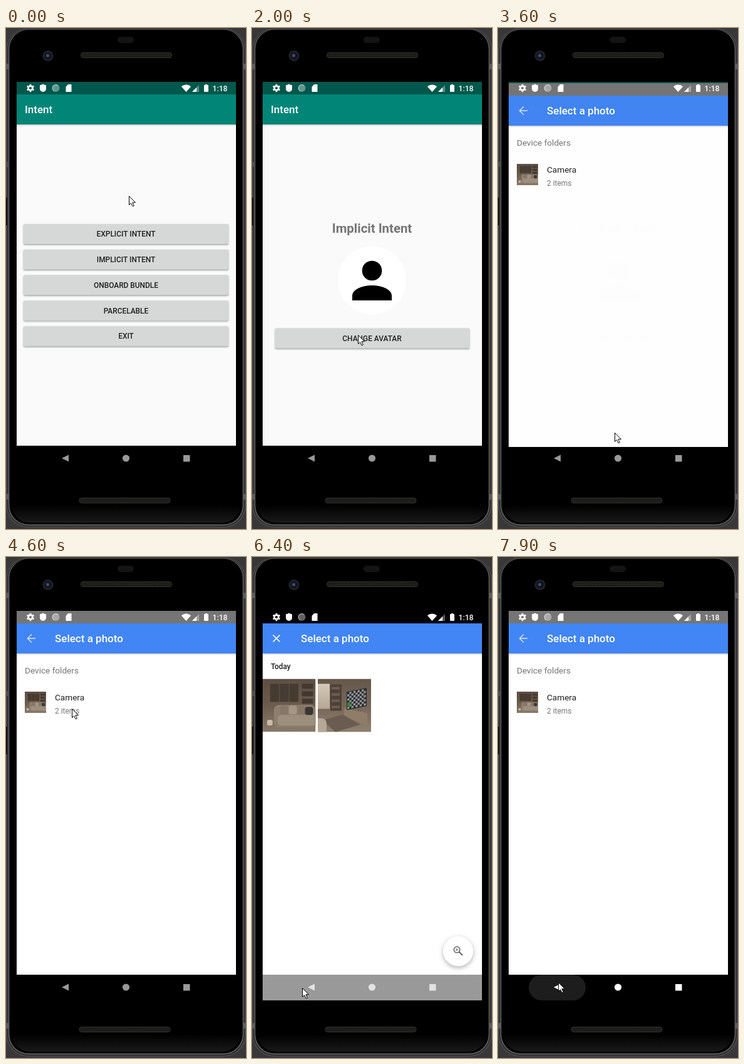
Write an HTML page with a canvas that moves like this. It is 383x800 px and loops after 8000 ms.

```html
<!DOCTYPE html>
<html lang="en">
<head>
<meta charset="utf-8">
<title>Intent demo</title>
<style>
html, body { margin: 0; width: 100%; height: 100%; overflow: hidden; background: #383838; }
canvas { display: block; }
</style>
</head>
<body>
<canvas id="stage" width="383" height="800"></canvas>
<script>
const newLayer = canvas => canvas.getContext('2d');
const g = newLayer(document.getElementById('stage'));
const backdrop = newLayer(Object.assign(document.createElement('canvas'), { width: 383, height: 800 }));
const LOOP = 8000, STEP = 100;
const LEFT = 17, TOP = 86, WIDTH = 350, NAV = 667, BOTTOM = 708, MID = 191.5;

const OPEN_AVATAR = 1300, OPEN_FOLDERS = 3500, OPEN_GRID = 5100, CLOSE_GRID = 7200, GRID_GONE = 7600;

// Pointer glides; bow is the sideways swing at half way
const START = { x: 196, y: 268 };
const GLIDES = [
  { from: 100, to: 800, x: 196, y: 375, bow: 2 },
  { from: 1700, to: 2000, x: 169, y: 490, bow: 0 },
  { from: 2000, to: 2200, x: 169, y: 499, bow: 0 },
  { from: 3000, to: 3600, x: 186, y: 646, bow: 5 },
  { from: 3800, to: 4600, x: 105, y: 242, bow: 0 },
  { from: 5700, to: 6400, x: 80, y: 688, bow: -33 },
  { from: 6800, to: 7100, x: 96, y: 679, bow: 0 }
];

function rect(x, y, w, h, color) {
  g.fillStyle = color;
  g.fillRect(x, y, w, h);
}
function round(x, y, w, h, r, color) {
  g.beginPath();
  g.roundRect(x, y, w, h, r);
  g.fillStyle = color;
  g.fill();
}
function disc(x, y, r, color) {
  g.beginPath();
  g.arc(x, y, r, 0, 7);
  g.fillStyle = color;
  g.fill();
}
function ring(x, y, r, width, color, from = 0, to = 7) {
  g.beginPath();
  g.arc(x, y, r, from, to);
  g.lineWidth = width;
  g.strokeStyle = color;
  g.stroke();
}
function trace(p) {
  g.beginPath();
  for (let i = 0; i < p.length; i += 2) g.lineTo(p[i], p[i + 1]);
}
function poly(color, ...p) {
  trace(p);
  g.closePath();
  g.fillStyle = color;
  g.fill();
}
function line(color, width, ...p) {
  trace(p);
  g.lineWidth = width;
  g.strokeStyle = color;
  g.stroke();
}
function text(s, x, y, size, weight, color, align = 'left') {
  g.font = `${weight} ${size}px Roboto, sans-serif`;
  g.textAlign = align;
  g.fillStyle = color;
  g.fillText(s, x, y);
}
function fade(y0, y1, ...colors) {
  const f = g.createLinearGradient(0, y0, 0, y1);
  colors.forEach((c, i) => f.addColorStop(i / (colors.length - 1), c));
  return f;
}
function raised(alpha, blur, dy, shape) {
  g.save();
  g.shadowColor = `rgba(0,0,0,${alpha})`;
  g.shadowBlur = blur;
  g.shadowOffsetY = dy;
  shape();
  g.restore();
}

function speaker(x, y) {
  round(x, y, 146, 9, 4.5, '#333');
  round(x + 1, y + 1, 144, 7, 3.5, '#1b1b18');
  for (let i = 4; i < 142; i += 3) rect(x + i, y + 3 + i % 2, 1, 2, '#2b2b26');
}

function phone() {
  rect(0, 0, 383, 800, '#383838');
  ['#4a4a4a', '#2b2b2b', '#5c5c5c', '#000'].forEach((color, i) => {
    const d = i * 1.8;
    round(d, d / 2, 383 - 2 * d, 798 - 1.5 * d, 36 - d, color);
  });
  round(8, 740, 367, 50, [0, 0, 30, 30], fade(762, 790, '#000', '#1a1a1a'));
  for (const x of [0, 378])
    for (const y of [57, 744]) rect(x, y, 5, 9, '#5d5d5d');
  rect(0, 214, 5, 8, '#505050');
  rect(0, 271, 1.5, 44, '#000');
  round(178, 14, 26, 10, 5, '#141414');
  disc(67, 44.5, 8.5, '#232326');
  disc(67, 44.5, 6, '#11131f');
  disc(66.5, 44, 2.5, '#414a78');
  speaker(119, 39);
  speaker(116.5, 750);
  rect(LEFT, TOP, WIDTH, BOTTOM - TOP, '#000');
}

function page(title, titleX, status, bar, bg, bottom = NAV) {
  rect(LEFT, TOP, WIDTH, bottom - TOP, bg);
  rect(LEFT, 154, WIDTH, 3, fade(154, 157, 'rgba(0,0,0,.2)', 'rgba(0,0,0,0)'));
  rect(LEFT, TOP, WIDTH, 20, status);
  rect(LEFT, 106, WIDTH, 48, bar);
  text(title, titleX, 136, 17, 500, '#fff');
}

function button(label, x, y, w, age = -1) {
  raised(.4, 2.5, 1.2, () => round(x, y, w, 32, 2, '#d6d7d7'));
  if (age >= 0 && age < 500) {
    const left = 1 - age / 500;
    g.save();
    g.clip();
    rect(x, y, w, 32, `rgba(0,0,0,${.08 * left})`);
    disc(MID, y + 16, 60 + age * .6, `rgba(0,0,0,${.12 * left})`);
    g.restore();
  }
  text(label, MID, y + 20.2, 11.9, 500, '#202020', 'center');
}

function menuPage(t) {
  page('Intent', 30, '#00574b', '#008577', '#fafafa');
  ['EXPLICIT INTENT', 'IMPLICIT INTENT', 'ONBOARD BUNDLE', 'PARCELABLE', 'EXIT'].forEach(
    (s, i) => button(s, 28, 313 + i * 40.8, 327, i == 1 ? t - 1200 : -1));
}

function avatarPage(t) {
  page('Intent', 30, '#00574b', '#008577', '#fafafa');
  text('Implicit Intent', MID, 326.5, 20.4, 700, '#757575', 'center');
  disc(MID, 403, 54.5, '#fff');
  disc(MID, 387.5, 15.8, '#000');
  g.beginPath();
  g.ellipse(MID, 427, 31.5, 16, 0, Math.PI, 0);
  g.fill();
  rect(160, 427, 63, 8, '#000');
  button('CHANGE AVATAR', 37, 479.5, 310, t - 2800);
}

// Runs draw() in an 85 unit square scaled to the given size
function photo(x, y, size, draw) {
  g.save();
  g.translate(x, y);
  g.scale(size / 85, size / 85);
  g.beginPath();
  g.rect(0, 0, 85, 85);
  g.clip();
  draw();
  g.restore();
}
function sofa() {
  rect(0, 0, 85, 85, fade(0, 85, '#5d4f43', '#6b5c4d', '#8a7a69'));
  for (let i = 0; i < 3; i++) {
    rect(12 + i * 15.5, 8, 14.5, 29, '#463b32');
    rect(63, 8 + i * 12, 18, 8, '#43382f');
  }
  round(18, 42, 67, 36, 8, '#8d7f6e');
  round(24, 58, 70, 17, 6, '#9d8f7d');
  for (let i = 0; i < 3; i++) round(28 + i * 14, 43, 13, 14, 4, i % 2 ? '#a49683' : '#857665');
  round(68, 45, 13, 13, 4, '#3a3432');
  round(7, 66, 9, 9, 3, '#c9bcaa');
}
function television() {
  rect(0, 0, 85, 85, fade(0, 85, '#65574a', '#75665a', '#8f806f'));
  rect(0, 8, 19, 40, fade(8, 48, '#d5cabb', '#b3a693'));
  rect(20, 9, 18, 42, '#4d4137');
  for (let i = 0; i < 4; i++) rect(22, 13 + i * 10, 13, 4, '#6d5e50');
  poly('#8f7d69', 42, 47, 79, 55, 79, 74, 42, 61);
  poly('#6a5c50', 8, 66, 40, 57, 68, 73, 28, 85);
  round(-10, 63, 24, 30, 8, '#b5a897');
  g.save();
  g.transform(1, -.2, 0, 1, 46, 21);
  rect(0, 0, 32, 29, '#2d2e2e');
  for (let i = 0; i < 72; i++)
    if ((i + (i / 9 | 0) % 2 * 0) % 2) rect(1 + i % 9 * 3.3, 1 + (i / 9 | 0) * 3.3, 3.3, 3.3, '#92959a');
  g.restore();
  rect(47, 38, 5, 6, '#2a8a35');
}

function folderPage() {
  page('Select a photo', 78, '#757575', '#4285f4', '#fff');
  const faint = 'rgba(255,255,255,.7)';
  line(faint, 1.7, 47, 130, 35, 130);
  line(faint, 1.7, 41, 123.5, 34.5, 130, 41, 136.5);
  text('Device folders', 30, 186, 13.6, 400, '#757575');
  photo(30, 215, 34, sofa);
  text('Camera', 78, 229, 13.6, 400, '#212121');
  text('2 items', 78, 250, 11.9, 400, '#757575');
}

function gridPage() {
  page('Select a photo', 78, '#000', '#4285f4', '#fff', BOTTOM);
  for (const s of [-5.5, 5.5]) line('#fff', 1.7, 39 - s, 124.5, 39 + s, 135.5);
  text('Today', 30, 178.5, 11.9, 500, '#212121');
  photo(17, 194.5, 84.5, sofa);
  photo(105, 194.5, 85, television);
  raised(.3, 7, 2.5, () => disc(329, 629.5, 24, '#fff'));
  const gray = '#616161';
  ring(327, 627, 4.7, 1.6, gray);
  line(gray, 2, 330.5, 630.5, 336, 636);
  line(gray, 1, 324.8, 627, 329.2, 627);
  line(gray, 1, 327, 624.8, 327, 629.2);
}

// Draws one page, shifted down and faded, over another
function slide(under, over, offset, t) {
  if (offset <= 0) return over(t);
  const hidden = Math.min(1, (offset / 38) ** 2);
  under(t);
  rect(LEFT, TOP, WIDTH, NAV - TOP, 'rgba(0,0,0,.12)');
  backdrop.drawImage(g.canvas, 0, 0);
  g.save();
  g.translate(0, offset);
  over(t);
  g.restore();
  g.globalAlpha = hidden;
  g.drawImage(backdrop.canvas, 0, 0);
  g.globalAlpha = 1;
}
const settle = (first, age) => Math.round(first * .138 ** (age / STEP));

function pages(t) {
  g.save();
  g.beginPath();
  g.rect(LEFT, TOP, WIDTH, BOTTOM - TOP);
  g.clip();
  if (t < OPEN_AVATAR) menuPage(t);
  else if (t < OPEN_FOLDERS) slide(menuPage, avatarPage, settle(13, t - OPEN_AVATAR), t);
  else if (t < OPEN_GRID) slide(avatarPage, folderPage, settle(18, t - OPEN_FOLDERS), t);
  else if (t <= CLOSE_GRID) slide(folderPage, gridPage, settle(33, t - OPEN_GRID), t);
  else if (t < GRID_GONE) slide(folderPage, gridPage, Math.round(40 * ((t - CLOSE_GRID) / 400) ** 2), t);
  else folderPage();
  g.restore();
}

function statusIcons() {
  const y = 96, white = '#fff';
  ring(39, y, 3.4, 2.6, white);
  for (let a = Math.PI / 6; a < 6.3; a += Math.PI / 3) {
    const c = Math.cos(a), s = Math.sin(a);
    line(white, 2.6, 39 + 4 * c, y + 4 * s, 39 + 6.2 * c, y + 6.2 * s);
  }
  round(54, 91, 10, 11, [1, 1, 5, 5], white);
  poly(white, 54, 92, 59, 89.5, 64, 92);
  disc(79.5, y, 6, 'rgba(255,255,255,.38)');
  ring(79.5, y, 5.3, 1.2, 'rgba(255,255,255,.5)', 2, 5.5);
  poly(white, 95.5, 94, 99, 90, 104.5, 90, 104.5, 102, 95.5, 102);
  g.beginPath();
  g.moveTo(287.5, 102);
  g.arc(287.5, 102, 11.5, -2.3, -.84);
  g.fill();
  poly('rgba(255,255,255,.35)', 297, 102, 308, 91, 308, 102);
  poly(white, 297, 102, 304, 95, 304, 102);
  round(316, 91, 7, 11, 1, white);
  rect(318, 90, 3, 2, white);
  text('1:18', 329.5, 101, 12.2, 500, white);
}

function navBar(t) {
  const grid = t >= OPEN_GRID && t < GRID_GONE;
  if (grid) rect(LEFT, NAV, WIDTH, BOTTOM - NAV, `rgba(0,0,0,${Math.min(.4, (t - 5000) / 850)})`);
  const press = t >= 7900 ? 1 : t >= 7100 ? Math.max(0, 1 - (t - 7100) / 500) : 0;
  round(49, NAV, 91, 41, 20.5, `rgba(255,255,255,${.115 * press})`);
  const color = t >= GRID_GONE ? '#fff' : grid ? '#e2e2e2' : '#999';
  poly(color, 89, 687, 100, 681.5, 100, 692.5);
  disc(MID, 687, 5.6, color);
  rect(283, 682, 10.5, 10.5, color);
}

function pointer(t) {
  let { x, y } = START;
  for (const m of GLIDES) {
    const k = Math.max(0, Math.min(1, (t - m.from) / (m.to - m.from)));
    x += (m.x - x) * k + m.bow * Math.sin(Math.PI * k);
    y += (m.y - y) * k;
  }
  g.save();
  g.translate(Math.round(x) + .5, Math.round(y) + .5);
  poly('#fff', 0, 0, 0, 14, 3, 11.2, 5.6, 16.3, 7.8, 15.3, 5.4, 10.2, 10, 10.2);
  g.strokeStyle = '#000';
  g.lineWidth = 1;
  g.stroke();
  g.restore();
}

function draw() {
  const t = Math.floor(performance.now() % LOOP / STEP) * STEP;
  phone();
  pages(t);
  statusIcons();
  navBar(t);
  pointer(t);
  requestAnimationFrame(draw);
}
draw();
</script>
</body>
</html>
```
